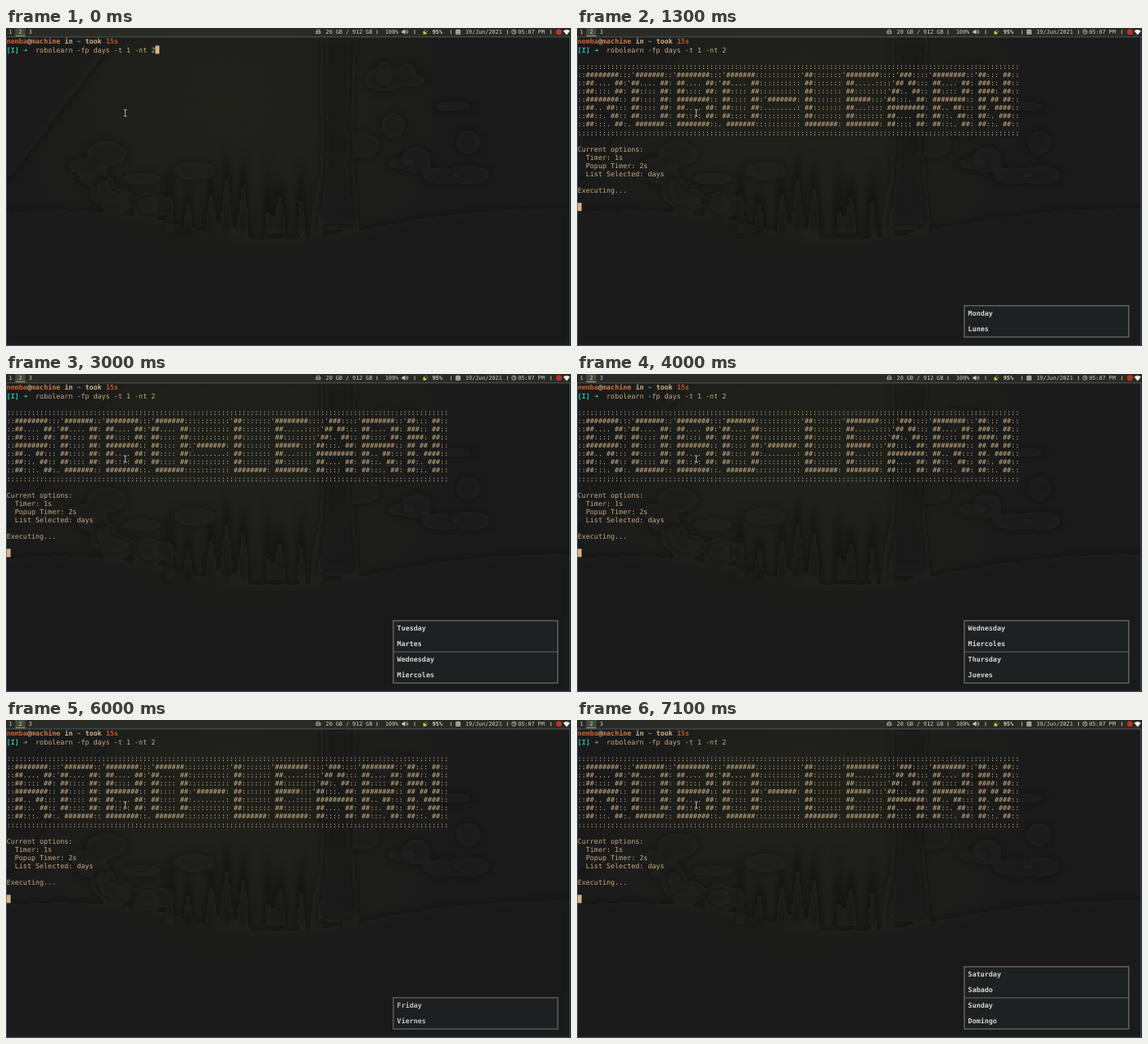
An HTML page for the animation above (8000 ms loop, 690 by 388 pixels).

```html
<!DOCTYPE html>
<html lang="en">
<head>
<meta charset="utf-8">
<title>Terminal flash cards</title>
<style>
html, body { margin: 0; width: 100%; height: 100%; overflow: hidden; background: #1b1b1a; }
svg { display: block; width: 100vw; height: 100vh; }
text { font: 8.39px "DejaVu Sans Mono", monospace; white-space: pre; text-rendering: geometricPrecision; }
.term { fill: #c9aa80; }
.bold, .note { font-weight: bold; }
.note { fill: #d3d4d2; }
.bar text { font-size: 6.75px; fill: #d2cfc4; }
</style>
</head>
<body>
<svg viewBox="0 0 690 388">
  <defs>
    <radialGradient id="glow" gradientUnits="userSpaceOnUse" cx="275" cy="85" r="270">
      <stop offset="0" stop-color="#20211b"/>
      <stop offset=".4" stop-color="#1f201b"/>
      <stop offset="1" stop-color="#1b1b1b"/>
    </radialGradient>
    <filter id="soft" x="-20%" y="-20%" width="140%" height="140%"><feGaussianBlur stdDeviation="5"/></filter>
  </defs>
  <rect width="690" height="388" fill="url(#glow)"/>
  <g id="forest" filter="url(#soft)"></g>
  <path d="M.4 10.8V387.4H688.7V10.8" fill="none" stroke="#42566a"/>
  <path d="M0 10.8H689.2" stroke="#5b6975"/>

  <g class="bar" id="bar">
    <rect width="690" height="10.3" fill="#2a2b24"/>
    <rect x="11.5" width="12" height="10" fill="#464c3c"/>
    <rect x="11.5" y="9" width="12" height="1.2" fill="#75a05c"/>
    <g fill="none" stroke="#d2cfc4" stroke-width=".8">
      <path d="M378.8 4.5L380 2.3H382.6L383.8 4.5V6.6H378.8ZM378.8 4.6H383.8"/>
      <path d="M488.4 3.2Q489.6 4.7 488.4 6.2M489.8 2.2Q492 4.7 489.8 7.2"/>
      <path d="M549.6 2.6H554.6V7.4H549.6ZM549.6 4H554.6M549.6 5.7H554.6M551.2 1.6V7.4M553 1.6V7.4"/>
      <circle cx="620.3" cy="4.7" r="2.6"/>
      <path d="M620.3 3V4.9H621.8"/>
    </g>
    <path d="M483.5 3.5H485L487.4 1.6V7.8L485 5.9H483.5Z" fill="#d2cfc4"/>
    <path d="M509.2 7.9L511 6M510.3 3.8L513.3 6.8Q511.8 7.9 510.2 6.6Q509.2 5.2 510.3 3.8ZM511.4 3.6L513.2 1.8M513.4 5.5L515.2 3.7" fill="#e3d73f" stroke="#e3d73f" stroke-width=".8"/>
    <circle cx="675.2" cy="4.8" r="3.5" fill="#b8322b"/>
    <path d="M680.6 3.5Q684.7 .4 688.8 3.5L684.7 8.4Z" fill="#f0f0ec"/>
  </g>

  <g id="prompt"></g>
  <g id="output" class="term"></g>
  <rect id="caret" width="5" height="10" fill="#d8b384"/>
  <path d="M143.9 99.9H147.5M145.7 99.9V107.6M143.9 107.6H147.5" fill="none" stroke="#11110f" stroke-width="2"/>
  <path d="M143.9 99.9H147.5M145.7 99.9V107.6M143.9 107.6H147.5" fill="none" stroke="#d5d5cf" stroke-width=".9"/>

  <g id="popup">
    <rect id="frame" x="473" width="200.8" fill="#1e2122" stroke="#626866" stroke-width="1.4"/>
    <path id="divider" d="M473 339H673.8" stroke="#626866" stroke-width="1.2"/>
    <text class="note" x="477.6" y="313.3"></text>
    <text class="note" x="477.6" y="332.3"></text>
    <text class="note" x="477.6" y="351.3"></text>
    <text class="note" x="477.6" y="370.3"></text>
  </g>
</svg>
<script>
const NS = "http://www.w3.org/2000/svg";
const LOOP = 8000, CELL = 5.05, ROW = 10.1;
const $ = id => document.getElementById(id);

function add(parent, tag, attrs, content = "") {
  const el = document.createElementNS(NS, tag);
  for (const key in attrs) el.setAttribute(key, attrs[key]);
  el.textContent = content;
  parent.appendChild(el);
  return el;
}

const print = (parent, row, col, content, attrs = {}) =>
  add(parent, "text", { x: .7 + col * CELL, y: 19.4 + row * ROW, ...attrs }, content);

// Dim woodland wallpaper
function drawForest() {
  let seed = 11;
  const rnd = () => (seed = seed * 16807 % 2147483647) / 2147483647;
  const g = $("forest");
  const shade = (d, opacity) => add(g, "path", { d, fill: "#1a1a1a", opacity });
  shade("M0 11H135L60 110L0 190Z", .4);
  shade("M387 11H425L420 150L428 242H383L388 150Z", .8);
  for (let i = 0; i < 9; i++) {
    const x = 200 + i * 22 + rnd() * 12, top = 130 + rnd() * 60, w = 4 + rnd() * 5;
    shade(`M${x} ${top}L${x + w} 250H${x - w}Z`, .6);
  }
  for (let i = 0; i < 24; i++) {
    const right = i % 2;
    add(g, "ellipse", {
      cx: right ? 430 + rnd() * 140 : 80 + rnd() * 150,
      cy: right ? 50 + rnd() * 130 : 140 + rnd() * 80,
      rx: 10 + rnd() * 18, ry: 6 + rnd() * 10, fill: "#1a1a1a", opacity: .35
    });
  }
  shade("M0 225Q120 215 220 243T440 245T690 220V388H0Z", .4);
}

function drawBar() {
  const items = [
    [3.6, "1"], [15.5, "2"], [27.8, "3"], [390.6, "20 GB / 912 GB"], [463, "100%"],
    [520.8, "95%", "bold"], [561, "19/Jun/2021"], [625.2, "05:07 PM"]
  ];
  for (const [x, label, style = ""] of items)
    add($("bar"), "text", { x, y: 7, class: style }, label);
  for (const x of [453, 499, 543.3, 612.3, 665.3])
    add($("bar"), "rect", { x: x - .4, y: 2.4, width: .9, height: 5, fill: "#c5c2b8" });
}

function drawPrompt() {
  const parts = [
    [0, 0, "nemba", "#c9602f"], [0, 5, "@", "#d0b086"], [0, 6, "machine", "#d07a48"],
    [0, 14, "in", "#d0b086"], [0, 17, "~", "#4f9d9b"], [0, 19, "took", "#d0b086"],
    [0, 24, "15s", "#c2552f"], [1, 0, "[I]", "#2fbfb0"], [1, 4, "➜", "#35d0b4"]
  ];
  for (const [row, col, label, fill] of parts)
    print($("prompt"), row, col, label, { fill, class: "bold" });
  print($("prompt"), 1, 7, "robolearn -fp days -t 1 -nt 2", { class: "term" });
}

const GLYPHS = {
  R: ["'########::", " ##.... ##:", " ##:::: ##:", " ########::", " ##.. ##:::", " ##::. ##::", " ##:::. ##:"],
  O: [":'#######::", "'##.... ##:", " ##:::: ##:", " ##:::: ##:", " ##:::: ##:", " ##:::: ##:", ". #######::"],
  B: ["'########::", " ##.... ##:", " ##:::: ##:", " ########::", " ##.... ##:", " ##:::: ##:", " ########::"],
  "-": [":::::::::", ":::::::::", ":::::::::", "'#######:", "........:", ":::::::::", ":::::::::"],
  L: ["'##:::::::", ...Array(5).fill(" ##:::::::"), " ########:"],
  E: ["'########:", " ##.....::", " ##:::::::", " ######:::", " ##...::::", " ##:::::::", " ########:"],
  A: [":::'###::::", "::'## ##:::", ":'##:. ##::", "'##:::. ##:", " #########:", " ##.... ##:", " ##:::: ##:"],
  N: ["'##::: ##:", " ###:: ##:", " ####: ##:", " ## ## ##:", " ##. ####:", " ##:. ###:", " ##::. ##:"]
};

function drawOutput() {
  const out = $("output");
  const line = (row, label) => print(out, row, 0, label);
  for (let i = 0; i < 7; i++) {
    const body = [..."ROBO-LEARN"].map(c => GLYPHS[c][i]).join("");
    line(4 + i, "::" + body.slice(1) + ":");
  }
  line(3, ":".repeat(107));
  line(11, ":".repeat(107));
  line(13, "Current options:");
  line(14, "  Timer: 1s");
  line(15, "  Popup Timer: 2s");
  line(16, "  List Selected: days");
  line(18, "Executing...");
}

const DAYS = [
  ["Monday", "Lunes"], ["Tuesday", "Martes"], ["Wednesday", "Miercoles"], ["Thursday", "Jueves"],
  ["Friday", "Viernes"], ["Saturday", "Sabado"], ["Sunday", "Domingo"]
];
// [start, cards shown, opacity]
const STEPS = [
  [0, [], 0], [1000, [0], .5], [1100, [0], 1], [2000, [0, 1], 1], [3000, [1, 2], 1],
  [4000, [2, 3], 1], [5000, [3, 4], 1], [6000, [4], .9], [6100, [4, 5], 1],
  [7000, [5], .9], [7100, [5, 6], 1]
];
const notes = document.querySelectorAll(".note");

function render(t) {
  const [, cards, opacity] = STEPS.findLast(step => t >= step[0]);
  const running = t >= 1000, tall = cards.length > 1;
  $("output").style.display = running ? "" : "none";
  $("caret").setAttribute("x", running ? .6 : 182.3);
  $("caret").setAttribute("y", running ? 213.3 : 21.5);
  $("popup").setAttribute("opacity", opacity);
  $("frame").setAttribute("y", tall ? 301 : 338.8);
  $("frame").setAttribute("height", tall ? 76 : 38.2);
  $("divider").style.display = tall ? "" : "none";
  const words = cards.flatMap(i => DAYS[i]);
  notes.forEach((note, i) => note.textContent = words[i - 4 + words.length] || "");
}

drawForest();
drawBar();
drawPrompt();
drawOutput();

const start = performance.now();
function tick() {
  render((performance.now() - start) % LOOP);
  requestAnimationFrame(tick);
}
tick();
</script>
</body>
</html>
```
